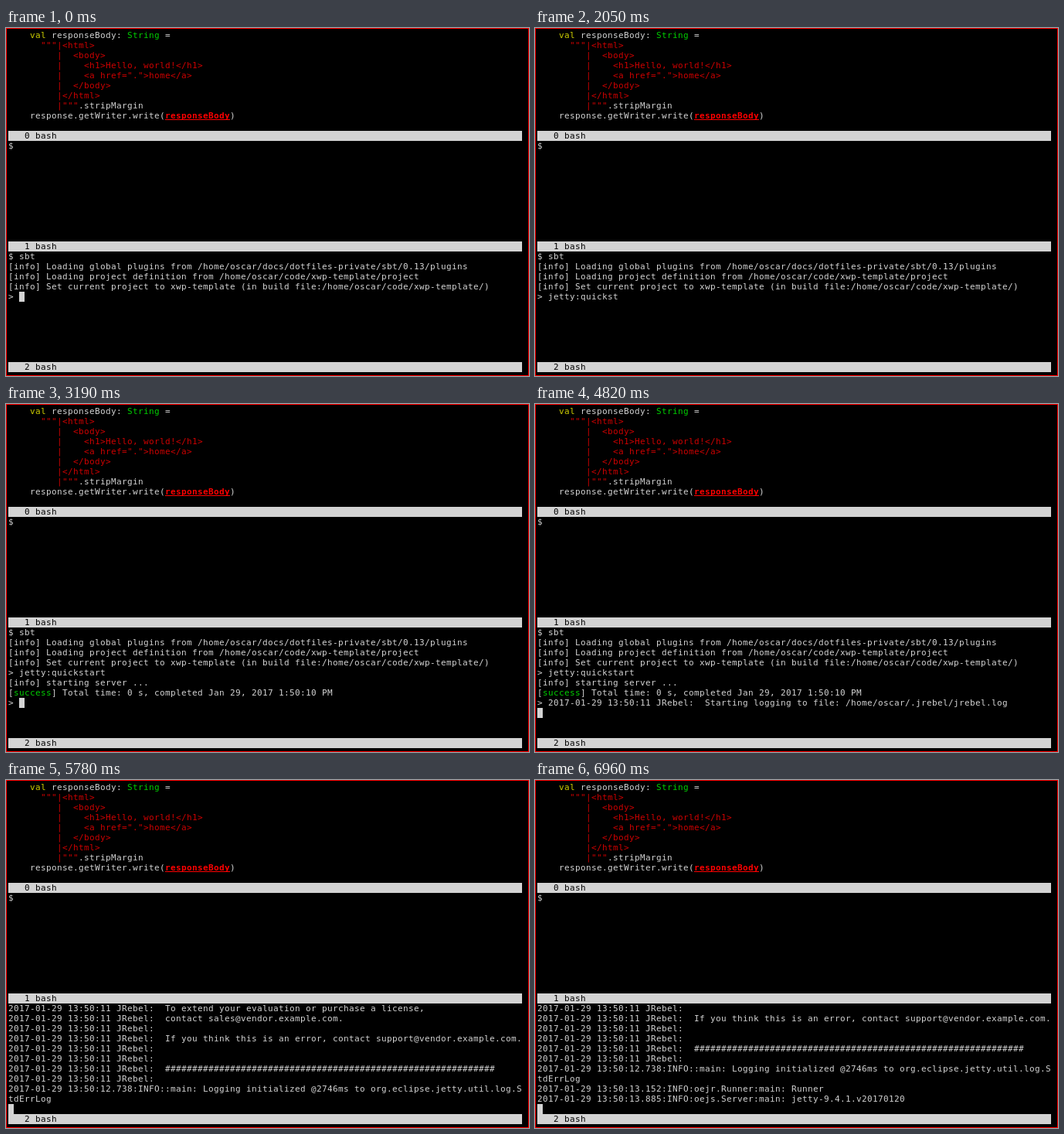
Recreate the animation shown at these times as an HTML page. Size 677 by 450 pixels, loop 8000 ms.

```html
<!DOCTYPE html>
<html lang="en">
<head>
<meta charset="utf-8">
<title>Terminal session</title>
<style>
  html, body { margin: 0; width: 100%; height: 100%; overflow: hidden; background: #000; }
  svg { display: block; }
  text {
    font: 11px "DejaVu Sans Mono", monospace;
    font-variant-ligatures: none;
    white-space: pre;
    fill: #d3d3d3;
  }
  .bar { fill: #d3d3d3; }
  .ink { fill: #000; }
  .red { fill: #cd0000; }
  .green { fill: #00cd00; }
  .yellow { fill: #cdcd00; }
  .hot { fill: #f00; font-weight: bold; }
  .edge { fill: none; stroke: #f00; }
</style>
</head>
<body>
<svg width="677" height="450" viewBox="0 0 677 450">
  <g id="fixed"></g>
  <g id="shell"></g>
  <rect class="edge" x="0.5" y="0.5" width="676" height="449"/>
</svg>
<script>
const LOOP = 8000, CELL_W = 7, CELL_H = 13, PAD = 3, ASCENT = 10, COLS = 95, SHELL_ROW = 22;
const fixed = document.getElementById('fixed');
const shell = document.getElementById('shell');

function add(parent, tag, attrs) {
  const el = document.createElementNS(parent.namespaceURI, tag);
  for (const key in attrs) el.setAttribute(key, attrs[key]);
  return parent.appendChild(el);
}

// Every glyph sits in its own terminal cell.
function put(parent, row, col, str, cls = '') {
  if (!str) return;
  const x = Array.from(str, (_, i) => PAD + (col + i) * CELL_W).join(' ');
  add(parent, 'text', { x, y: PAD + row * CELL_H + ASCENT, class: cls }).textContent = str;
}

function block(parent, row, col, cols = 1) {
  add(parent, 'rect', {
    x: PAD + col * CELL_W, y: PAD + row * CELL_H,
    width: cols * CELL_W, height: CELL_H, class: 'bar'
  });
}

function drawFixed() {
  put(fixed, 0, 4, 'val', 'yellow');
  put(fixed, 0, 8, 'responseBody:');
  put(fixed, 0, 22, 'String', 'green');
  put(fixed, 0, 29, '=');
  put(fixed, 1, 6, '"""|<html>', 'red');
  ['|  <body>', '|    <h1>Hello, world!</h1>', '|    <a href=".">home</a>',
   '|  </body>', '|</html>', '|"""'].forEach((str, i) => put(fixed, 2 + i, 9, str, 'red'));
  put(fixed, 7, 13, '.stripMargin');
  put(fixed, 8, 4, 'response.getWriter.write(');
  put(fixed, 8, 29, 'responseBody', 'hot');
  add(fixed, 'rect', { x: 206, y: 118, width: 84, height: 1, class: 'hot' });
  put(fixed, 8, 41, ')');
  put(fixed, 11, 0, '$');
  [10, 21, 33].forEach((row, i) => {
    block(fixed, row, 0, COLS);
    put(fixed, row, 3, i + ' bash', 'ink');
  });
}

const command = 'jetty:quickstart';
const agent = (msg = '') => '2017-01-29 13:50:11 JRebel:  ' + msg;
const log = [
  '$ sbt',
  '[info] Loading global plugins from /home/oscar/docs/dotfiles-private/sbt/0.13/plugins',
  '[info] Loading project definition from /home/oscar/code/xwp-template/project',
  '[info] Set current project to xwp-template (in build file:/home/oscar/code/xwp-template/)',
  '> ' + command,
  '[info] starting server ...',
  '[success] Total time: 0 s, completed Jan 29, 2017 1:50:10 PM',
  '> ' + agent('Starting logging to file: /home/oscar/.jrebel/jrebel.log'),
  agent('Days left until license expires: 14'),
  agent(),
  agent('To extend your evaluation or purchase a license,'),
  agent('contact sales@vendor.example.com.'),
  agent(),
  agent('If you think this is an error, contact support@vendor.example.com.'),
  agent(),
  agent(),
  agent('#'.repeat(61)),
  agent(),
  '2017-01-29 13:50:12.738:INFO::main: Logging initialized @2746ms to org.eclipse.jetty.util.log.S',
  'tdErrLog',
  '2017-01-29 13:50:13.152:INFO:oejr.Runner:main: Runner',
  '2017-01-29 13:50:13.885:INFO:oejs.Server:main: jetty-9.4.1.v20170120'
];

// Key press times; where blinks is 1 the cursor returns 40 ms after the letter.
const keys = [740, 800, 890, 1070, 1160, 1380, 1480, 1560, 1670, 1740, 1850, 1970, 2050, 2160, 2240, 2380];
const blinks = '0011110101101100';

// time, first line, end line, cursor row (-1 hides it), cursor column
const output = [
  [2500, 0, 5, 5, 0],
  [3020, 0, 6, 6, 0],
  [3080, 0, 7, 6, 60],
  [3140, 0, 7, 7, 0],
  [3190, 0, 8, 7, 2],
  [4820, 0, 8, 8, 0],
  [4870, 8, 18, -1, 0],
  [4910, 8, 18, 10, 0],
  [5780, 10, 20, 10, 0],
  [6190, 11, 20, 10, 0],
  [6230, 11, 21, 10, 0],
  [6920, 12, 21, 10, 0],
  [6960, 12, 22, 10, 0]
];

function stateAt(t) {
  const step = output.filter(s => s[0] <= t).pop();
  if (step) {
    const [, first, end, row, col] = step;
    const lines = log.slice(first, end);
    if (t < 4820 && end === 8) lines[7] = '> ';
    return { lines, row, col };
  }
  const typed = keys.filter(k => k <= t).length;
  const hidden = typed && blinks[typed - 1] === '1' && t < keys[typed - 1] + 40;
  return {
    lines: [...log.slice(0, 4), '> ' + command.slice(0, typed)],
    row: hidden ? -1 : 4,
    col: 2 + typed
  };
}

let shown = '';
function render(t) {
  const state = stateAt(t);
  const id = JSON.stringify(state);
  if (id === shown) return;
  shown = id;
  shell.replaceChildren();
  state.lines.forEach((line, i) => {
    let col = 0;
    for (const part of line.split(/(success)/)) {
      put(shell, SHELL_ROW + i, col, part, part === 'success' ? 'green' : '');
      col += part.length;
    }
  });
  if (state.row >= 0) block(shell, SHELL_ROW + state.row, state.col);
}

drawFixed();
render(0);
const start = performance.now();
function tick() {
  render((performance.now() - start) % LOOP);
  requestAnimationFrame(tick);
}
requestAnimationFrame(tick);
</script>
</body>
</html>
```
